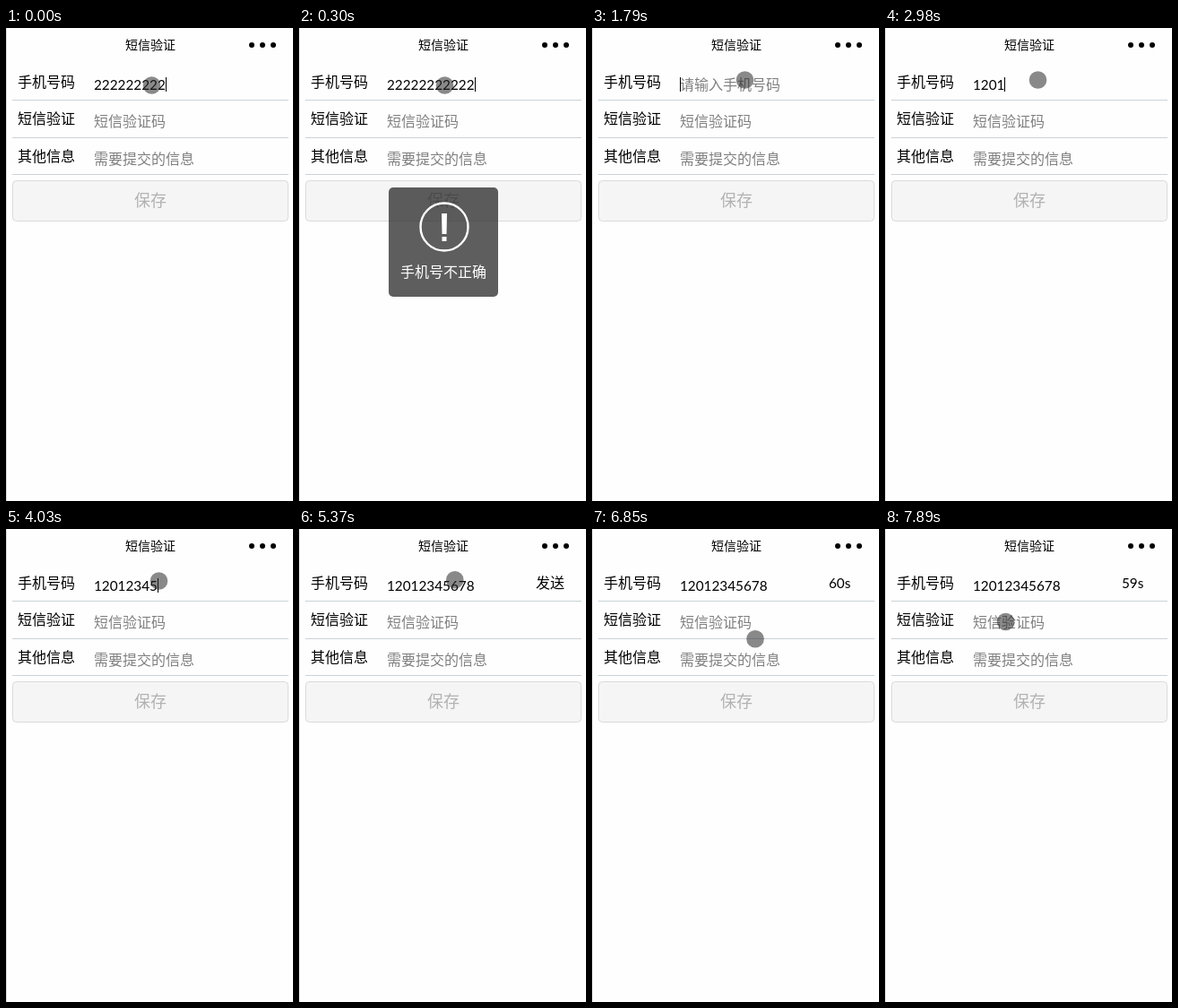
Animation, 320 px wide and 528 px high, one loop 8 s. Source, as an HTML page:

```html
<!DOCTYPE html>
<html lang="zh-CN">
<head>
<meta charset="utf-8">
<title>短信验证</title>
<style>
  html, body { margin: 0; width: 100%; height: 100%; overflow: hidden; background: #fefefe; }
  svg { display: block; width: 320px; height: 528px; }
  text { font: 16px "Noto Sans CJK SC", "Noto Sans CJK", sans-serif; }
  .title { font-size: 14px; }
  .hint { fill: #808080; font-weight: 500; }
  .save { font-size: 18px; fill: #b2b2b2; }
  .num { font: 15.3px Lato, sans-serif; }
  .mid { text-anchor: middle; }
  .alert { fill: #fff; font-weight: 500; }
  .rule { stroke: #c9d3d7; }
  .caret { stroke: #000; }
</style>
</head>
<body>
<svg viewBox="0 0 320 528">
  <rect width="320" height="528" fill="#fefefe"/>
  <path d="M.5 0V528" stroke="#dcdcdc"/>
  <text class="title mid" x="161" y="24">短信验证</text>
  <path d="M274 19h24.010" stroke="#000" stroke-width="6" stroke-linecap="round" stroke-dasharray="0 12"/>

  <text x="13" y="66">手机号码</text>
  <text x="13" y="107">短信验证</text>
  <text x="13" y="149">其他信息</text>
  <path class="rule" d="M7 80.5H315M7 122.5H315M7 163.5H315"/>

  <text class="hint" id="hint" x="98" y="69">请输入手机号码</text>
  <text class="hint" x="98" y="110">短信验证码</text>
  <text class="hint" x="98" y="152">需要提交的信息</text>
  <text class="num" id="phone" x="98" y="68.5"></text>
  <text id="send" x="264" y="66">发送</text>
  <text class="num" id="count" x="264" y="65.5"></text>
  <path class="caret" id="caret"/>

  <rect x="7.5" y="170.5" width="307" height="45" rx="4" fill="#f5f5f5" stroke="#dadada"/>
  <text class="save mid" x="161" y="199">保存</text>

  <g id="toast">
    <rect x="100" y="178" width="122" height="122" rx="5" fill="#282828" fill-opacity=".75"/>
    <circle cx="162" cy="222" r="26.5" fill="none" stroke="#fff" stroke-width="2.4"/>
    <path d="M159 207h6l-.5 23h-5zM159.5 233h5v5h-5z" fill="#fff"/>
    <text class="alert mid" x="161" y="278">手机号不正确</text>
  </g>
  <circle id="touch" r="9.8" fill="#282828" fill-opacity=".55"/>
</svg>
<script>
  const LOOP = 8000, TICK = 148.8; // the screen refreshes once per tick
  const $ = id => document.getElementById(id);
  const [hint, phone, send, count, caret, toast, touch] =
    ['hint', 'phone', 'send', 'count', 'caret', 'toast', 'touch'].map($);

  const WRONG = '2'.repeat(11);
  const RIGHT = '12012345678';
  const DIGIT = 8.87;
  const CLEARED = 10, SENT = 43, CODE = 50;
  const KEYS = [14, 16, 16, 20, 22, 23, 23, 27, 28, 31, 33]; // tick of each key press

  // Curved strokes of the finger, each starting where the last one ended
  const REST = [162.5, 64];
  const STROKES = [
    { from: 3, to: 6, pow: 1, ctrl: [165, 93], end: [170.5, 58] },
    { from: 35, to: 39, pow: 2.7, ctrl: [240, 32], end: [309, 45] },
    { from: 39, to: SENT, pow: 1, ctrl: [299, 35], end: [265, 90] },
    { from: SENT, to: 48, pow: 1, ctrl: [190, 148], end: [134.5, 103.5] }
  ];

  const clamp = (v, lo, hi) => Math.min(hi, Math.max(lo, v));
  const within = (k, a, b) => k >= a && k < b;
  const show = (el, on) => el.setAttribute('visibility', on ? 'visible' : 'hidden');
  const bend = (a, c, b, u) => (1 - u) ** 2 * a + 2 * u * (1 - u) * c + u * u * b;

  function finger(k) {
    return STROKES.reduce((p, s) => {
      const u = clamp((k - s.from) / (s.to - s.from), 0, 1) ** s.pow;
      return p.map((v, i) => bend(v, s.ctrl[i], s.end[i], u));
    }, REST);
  }

  function digits(k) {
    if (k >= CLEARED) return RIGHT.slice(0, KEYS.filter(key => key <= k).length);
    return WRONG.slice(0, k < CLEARED - 1 ? 9 + k : 5);
  }

  function draw(ms) {
    const k = Math.floor(ms / TICK);
    const number = digits(k);
    phone.textContent = number;
    show(hint, !number);

    const inCode = k >= CODE;
    const x = inCode ? 98.5 : Math.round(98 + number.length * DIGIT) + 0.5;
    caret.setAttribute('d', `M${x} ${inCode ? 97 : 55}v16`);
    show(caret, k < 36 || within(k, CODE, CODE + 3));

    show(toast, within(k, 2, 12));
    show(send, within(k, KEYS.at(-1), SENT));
    count.textContent = k < SENT ? '' : `${inCode ? 59 : 60}s`;

    const [cx, cy] = finger(k);
    touch.setAttribute('cx', cx);
    touch.setAttribute('cy', cy);
  }

  const start = performance.now();
  function tick() {
    draw((performance.now() - start) % LOOP);
    requestAnimationFrame(tick);
  }
  tick();
</script>
</body>
</html>
```
